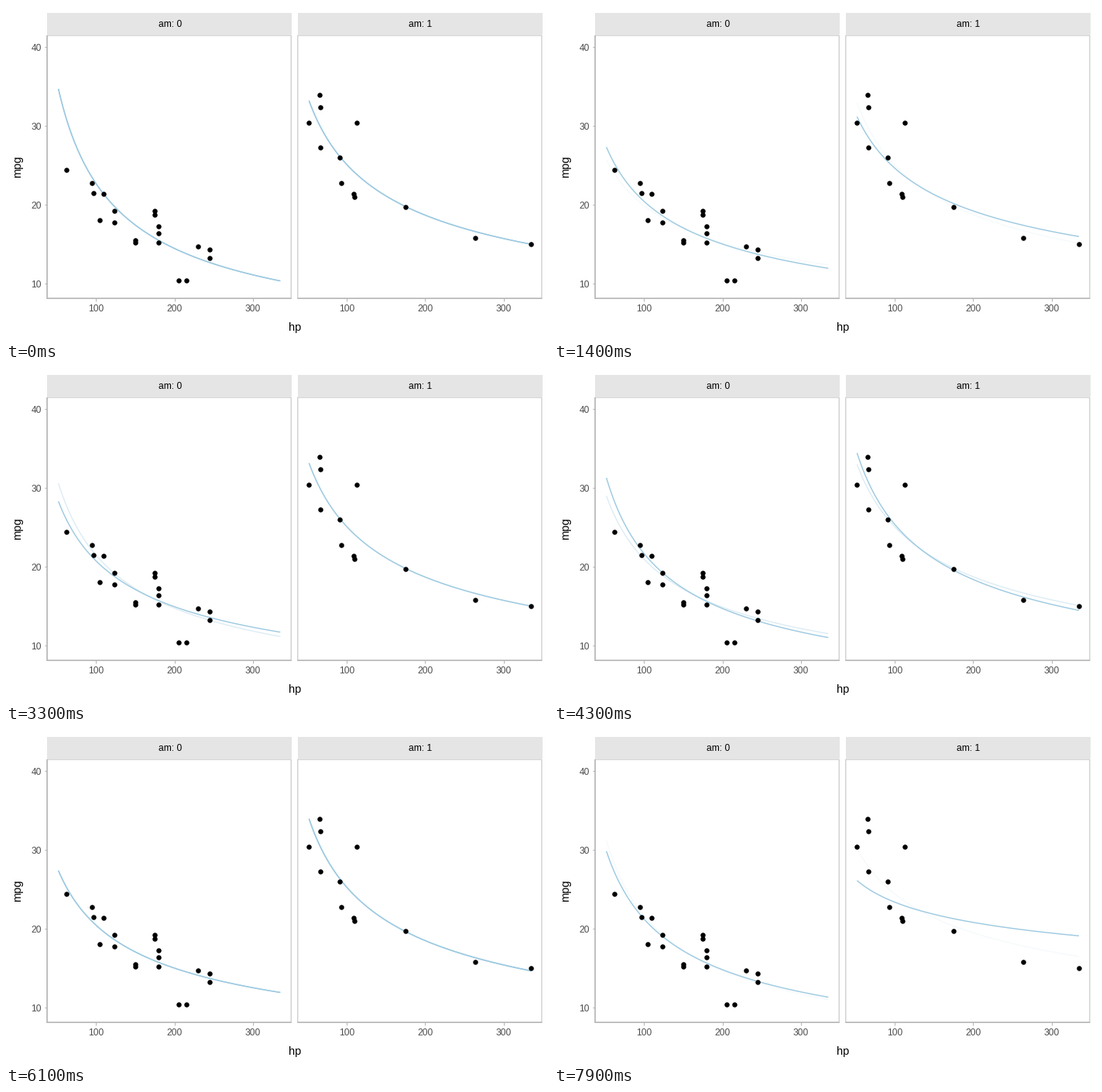
Recreate the animation shown at these times as a matplotlib script. Size 700 px wide and 432 px high, loop 8 s.

```python
import matplotlib.pyplot as plt
import numpy as np
from matplotlib.animation import FuncAnimation
from matplotlib.patches import Rectangle

W, H, DPI = 700, 432, 100
PX = 72 / DPI  # points per pixel
HOLD = 5       # frames per draw, the last one at rest
FRAMES = 80
BLUE, GREY, PALE, INK = "#9ecae1", "#b3b3b3", "#c8c8c8", "#4d4d4d"
TOP, BOTTOM = 38.1, 378.2

plt.rcParams["font.family"] = "Liberation Sans"
fig = plt.figure(figsize=(W / DPI, H / DPI), dpi=DPI, facecolor="white")
ax = fig.add_axes([0, 0, 1, 1])
ax.set_xlim(0, W)
ax.set_ylim(H, 0)
ax.axis("off")

HP = np.linspace(52, 335, 101)
SHARE = np.log(HP / HP[0]) / np.log(HP[-1] / HP[0])


def py(mpg):
    return 53.2 + (40 - np.asarray(mpg)) * 10.2


def rule(x, y, color=GREY, width=1, z=1, snap=None):
    ax.plot(x, y, color=color, lw=width * PX, solid_capstyle="butt",
            zorder=z, snap=snap)


def label(x, y, text, size=12, color="black", **kw):
    opts = dict(ha="center", va="baseline") | kw
    ax.text(x, y, text, fontsize=size * PX, color=color, **opts)


class Panel:
    """One facet: its cars as {hp: mpg values}, and its fitted curves.

    Every curve is a power law. Its start height also sets its end,
    since steeper fits pivot about the middle of the data.
    """

    def __init__(self, left, title, cars, starts, pivot):
        self.left, self.right = left, left + 315.1
        self.starts = starts
        self.pivot = pivot
        self.frame(title)
        pts = [(hp, m) for hp, mpgs in cars.items() for m in mpgs]
        hp, mpg = np.array(pts).T
        ax.plot(self.px(hp), py(mpg), "o", color="black", ms=6.5 * PX, mew=0, zorder=6)
        self.ghost, self.line = (
            ax.plot([], [], color=BLUE, lw=1.45 * PX, solid_capstyle="butt", zorder=z)[0]
            for z in (4, 5))

    def px(self, hp):
        return self.left + 63.2 + (np.asarray(hp) - 100) * 1.0127

    def frame(self, title):
        l, r = self.left, self.right
        ax.add_patch(Rectangle((round(l), 9), 316, 28, fc="#e5e5e5", lw=0))
        label((l + r) / 2 + 1.2, 27, title)
        ax.add_patch(Rectangle((l, TOP), r - l, BOTTOM - TOP, fill=False, ec=PALE,
                               lw=1.2 * PX, zorder=1, snap=False))
        rule([l - .5, r + .5], [BOTTOM, BOTTOM], width=1.4, z=2, snap=False)
        for hp in (100, 200, 300):
            x = self.px(hp)
            rule([x, x], [BOTTOM, BOTTOM + 4])
            label(x, 394.7, str(hp), color=INK)

    def curve(self, n):
        lo = self.starts[n]
        start, end, power = self.pivot
        hi = end * (start / lo) ** power
        return lo * (hi / lo) ** SHARE

    def show(self, n, e):
        old, new = self.curve(n), self.curve(n + 1)
        x = self.px(HP)
        self.ghost.set_data(x, py(old))
        self.ghost.set_alpha(1 - e)
        self.line.set_data(x, py(old + (new - old) * e))


panels = [
    Panel(53.1, "am: 0",
          {62: [24.4], 95: [22.8], 97: [21.5], 105: [18.1], 110: [21.4],
           123: [17.8, 19.2], 150: [15.2, 15.5], 175: [18.7, 19.2],
           180: [15.2, 16.4, 17.3], 205: [10.4], 215: [10.4], 230: [14.7],
           245: [13.3, 14.3]},
          [34.7, 28.4, 25.7, 27.5, 30.6, 28.6, 30.6, 27.1, 29,
           32.5, 24.7, 28.2, 27.4, 27.2, 28.5, 31.2, 29.7],
          (30, 11.3, .6)),
    Panel(376.8, "am: 1",
          {52: [30.4], 65: [33.9], 66: [27.3, 32.4], 91: [26], 93: [22.8],
           109: [21.4], 110: [21], 113: [30.4], 175: [19.7], 264: [15.8],
           335: [15]},
          [33.2, 35.6, 32.9, 31, 31.7, 37, 33.1, 33.2, 33,
           35.2, 36.3, 34.8, 34, 33, 32.3, 30.2, 25.7],
          (33, 15.1, 1)),
]

rule([panels[0].left] * 2, [TOP, BOTTOM + .5], width=1.4, z=2, snap=False)
for mpg in (10, 20, 30, 40):
    y = py(mpg)
    rule([49.5, 53], [y, y])
    label(46, y + 4.3, str(mpg), color=INK, ha="right")
label(373, 420, "hp", 14.67)
label(19, 208, "mpg", 14.67, rotation=90, rotation_mode="anchor")


def update(frame):
    n, step = divmod(frame, HOLD)
    ease = (1 - np.cos(np.pi * step / HOLD)) / 2
    for panel in panels:
        panel.show(n, ease)


anim = FuncAnimation(fig, update, frames=FRAMES, interval=100,
                     repeat=True, repeat_delay=0, blit=False)
plt.show()
```
